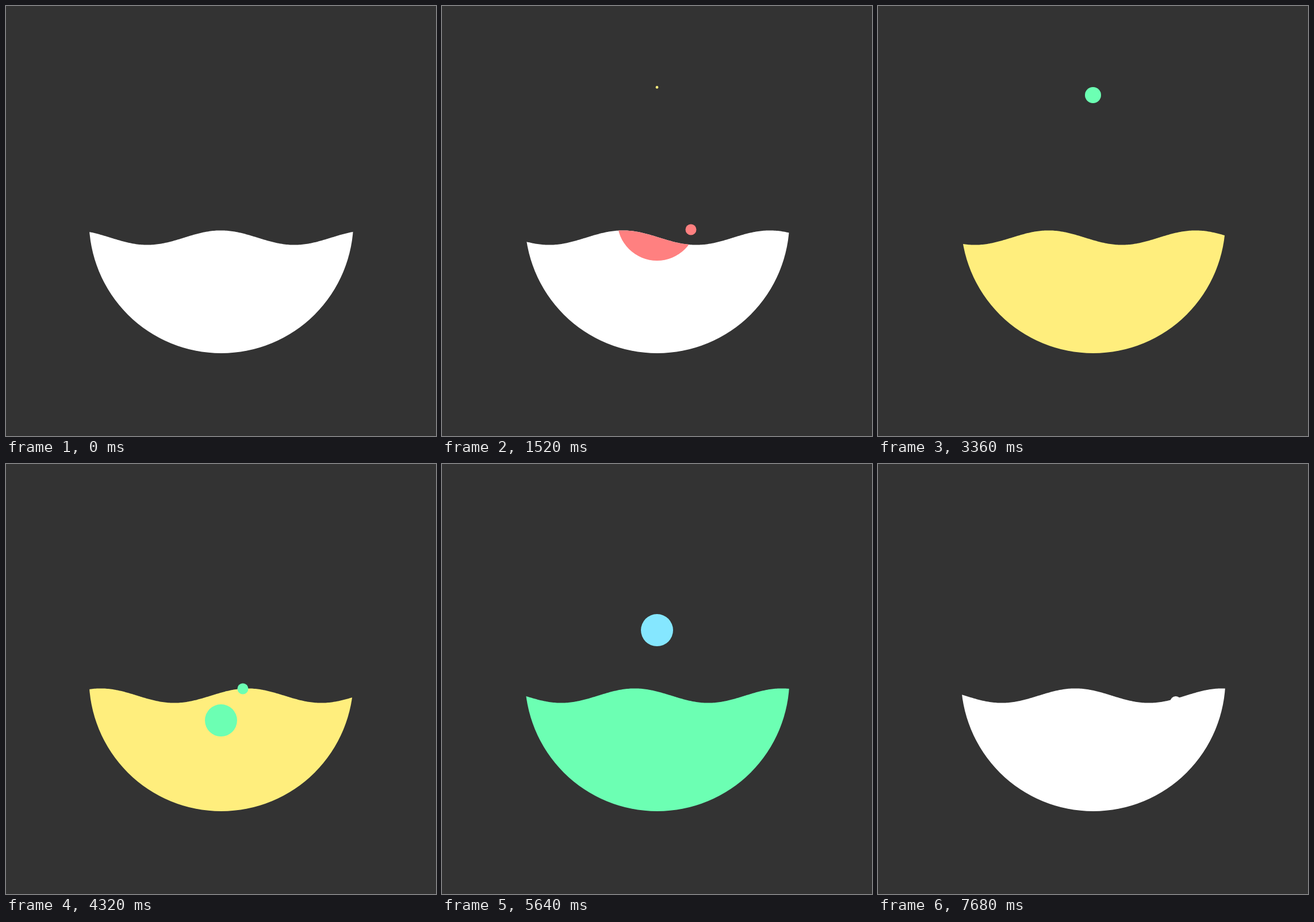
Recreate the animation shown at these times as an HTML page with a canvas. Size 748x748 px, loop 7720 ms.

```html
<!DOCTYPE html>
<html lang="en">
<head>
<meta charset="utf-8">
<title>Colour drops</title>
<style>
  html, body { margin: 0; width: 100%; height: 100%; overflow: hidden; background: #333; }
  canvas { display: block; width: 748px; height: 748px; }
</style>
</head>
<body>
<canvas id="stage" width="748" height="748"></canvas>
<script>
const ctx = document.getElementById('stage').getContext('2d');
const SIZE = 748, MID = 374, BOWL = 230;
const STEP = 40, STEPS = 193;      // 25 steps per second
const GAP = 36;                    // steps between two drops
const GROW = 24, HIT = 36, SPREAD = 35, FULL = 45, SPLASH_END = 51;
const WHITE = '#ffffff';
const COLOURS = ['#ff8080', '#ffee7d', '#6cffb3', '#85e7ff', WHITE];
const WAVE = { y: 403, height: 12.6, length: 255.8, crest: 373.7, speed: 5.17 };

function disc(x, y, r, colour) {
  ctx.fillStyle = colour;
  ctx.beginPath();
  ctx.arc(x, y, r, 0, Math.PI * 2);
  ctx.fill();
}

function clipToWater(n) {
  ctx.beginPath();
  ctx.arc(MID + 0.4, MID, BOWL, 0, Math.PI * 2);
  ctx.clip();
  const crest = WAVE.crest + WAVE.speed * n;
  ctx.beginPath();
  ctx.moveTo(0, SIZE);
  for (let x = 0; x <= SIZE; x += 2) {
    const angle = (x - crest) / WAVE.length * Math.PI * 2;
    ctx.lineTo(x, WAVE.y - WAVE.height * Math.cos(angle));
  }
  ctx.lineTo(SIZE, SIZE);
  ctx.clip();
}

// slow drift while the drop swells, then a steep fall
function dropY(age) {
  if (age <= GROW) return 138.9 + 1.2375 * age + 0.00875 * age * age;
  const d = age - GROW;
  return 173.6 + 1.66 * d + 252.5 * Math.pow(d / (HIT - GROW), 3.2);
}

function splashAt(age) {
  const d = age - HIT;
  return {
    x: 412 + 10.83 * d - 0.1667 * d * d,
    y: 391 - d - 0.2083 * d * (d - 2) + 0.0826 * d * (d - 2) * (d - 6)
  };
}

function draw(n) {
  const drops = COLOURS.map((colour, i) => ({ colour, age: n - i * GAP }));
  const settled = drops.filter(d => d.age >= FULL).pop();

  ctx.fillStyle = '#333333';
  ctx.fillRect(0, 0, SIZE, SIZE);

  ctx.save();
  clipToWater(n);
  ctx.fillStyle = settled ? settled.colour : WHITE;
  ctx.fillRect(0, 0, SIZE, SIZE);
  for (const { colour, age } of drops) {
    if (age > SPREAD && age < FULL) {
      disc(MID, MID, BOWL * (age - SPREAD) / (FULL - SPREAD), colour);
    }
  }
  ctx.restore();

  for (const { colour, age } of drops) {
    if (age > 0 && age <= HIT) {
      disc(MID, dropY(age), 28 * Math.min(1, age / GROW), colour);
    }
    if (age >= HIT && age <= SPLASH_END) {
      const { x, y } = splashAt(age);
      disc(x, y, 9.5, colour);
    }
  }
}

const start = performance.now();
function tick() {
  const elapsed = performance.now() - start;
  draw(Math.floor(elapsed / STEP) % STEPS);
  requestAnimationFrame(tick);
}
tick();
</script>
</body>
</html>
```
